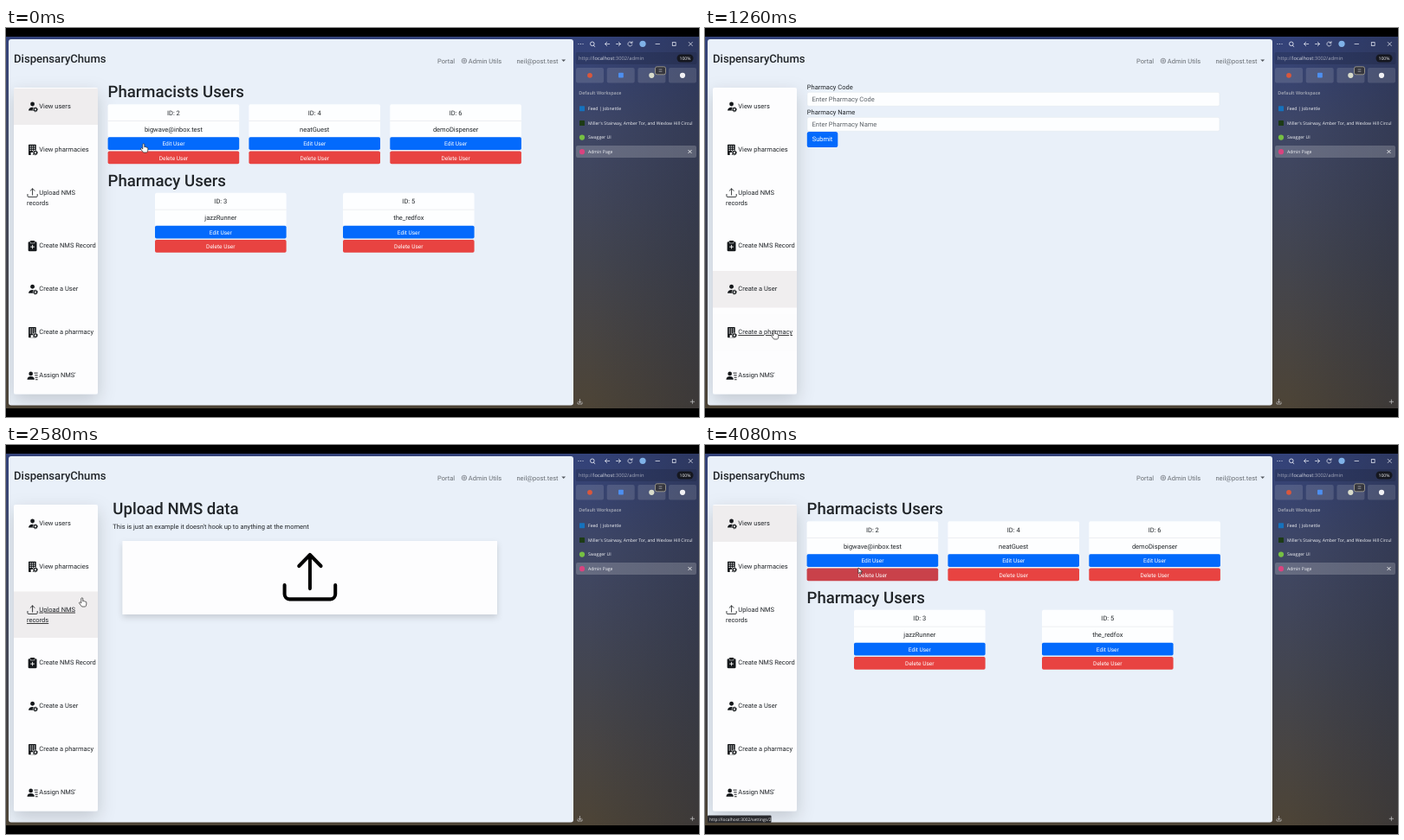
Recreate the animation shown at these times as an HTML page. Size 800 px wide and 450 px high, loop 4140 ms.

```html
<!DOCTYPE html>
<html lang="en">
<head>
<meta charset="utf-8">
<title>Admin page walkthrough</title>
<style>
  html, body { margin: 0; width: 100%; height: 100%; overflow: hidden; background: #000; }
  svg { display: block; width: 800px; height: 450px; }
  text { font: 7.5px Roboto, sans-serif; fill: #212529; text-rendering: geometricPrecision; }
  .h1 { font-size: 18.6px; font-weight: 500; }
  .brand { font-size: 13.1px; font-weight: 500; }
  .nav { fill: #696e74; }
  .btn { font-size: 6.56px; fill: #fff; }
  .big { fill: #fff; }
  .hint { fill: #5b6167; }
  .date { word-spacing: -.35px; }
  .tab { font: 5.1px "Open Sans", sans-serif; fill: #f2f3f6; }
  .space { font: 600 5.4px "Open Sans", sans-serif; fill: #a9adb9; }
  .url { font: 5.8px "Open Sans", sans-serif; fill: #a4a9bb; }
  .status { font: 4.9px "Open Sans", sans-serif; fill: #eee; }
  .line { fill: none; stroke-linecap: round; stroke-linejoin: round; }
</style>
</head>
<body>
<svg id="stage" viewBox="0 0 800 450"></svg>
<script>
const LOOP = 4140, STEP = 60, FADE = 200;
const BLUE = '#036afc', RED = '#e84341', INK = '#15181b';

const rect = (x, y, w, h, fill, r = 0, more = '') =>
  `<rect x="${x}" y="${y}" width="${w}" height="${h}" rx="${r}" fill="${fill}" ${more}/>`;
const dot = (x, y, r, fill, more = '') => `<circle cx="${x}" cy="${y}" r="${r}" fill="${fill}" ${more}/>`;
const line = (d, color, width = 1) => `<path class="line" d="${d}" stroke="${color}" stroke-width="${width}"/>`;
// y is the visual middle of the line of text
const text = (x, y, s, cls = '', anchor = 'start') =>
  `<text x="${x}" y="${y + 2.7}" class="${cls}" text-anchor="${anchor}">${s}</text>`;
const heading = (x, y, s) => `<text x="${x}" y="${y}" class="h1">${s}</text>`;

const gear = (x, y) => dot(x, y, 4, '#fff') + dot(x, y, 2.3, 'none', `stroke="${INK}" stroke-width="1.7"`) +
  dot(x, y, 3.4, 'none', `stroke="${INK}" stroke-width="1" stroke-dasharray="1.35 1.32"`);
const uploadPath = 'M.6 10v2.6a1.4 1.4 0 0 0 1.4 1.4h12a1.4 1.4 0 0 0 1.4-1.4V10M8 11V1.5M4.8 4.6 8 1.4l3.2 3.2';

const icons = {
  user: dot(8, 4.2, 3.2, INK) + `<path d="M2 14c0-3 2.5-5 6-5 2 0 4 .8 5 2v3z" fill="${INK}"/>` + gear(12.4, 12.5),
  building: rect(2, 0, 11.5, 16, INK, 1) +
    [3, 6, 9].map(y => [4, 7, 10].map(x => rect(x, y - 1, 1.6, 1.6, '#fff')).join('')).join('') +
    rect(5.5, 12, 3, 4, '#fff') + gear(12.4, 12.5),
  upload: line(uploadPath, INK, 1.1),
  clip: rect(1.5, 1.5, 13, 14.5, INK, 1.8) + rect(4.5, 0, 7, 3.4, INK, 1) +
    line('M5 2.5v1.3h6V2.5', '#fff', .7) + line('M8 6.8v5M5.5 9.3h5', '#fff', 1.2),
  lines: dot(5.5, 5, 3.1, INK) + `<path d="M0 14c0-3 2-5 5.5-5s5.5 2 5.5 5z" fill="${INK}"/>` +
    line('M11 4h4.5M12 7.4h3.5M12.5 10.7h3M13 14h2.5', INK, 1.2)
};

// name, row top, row height, text middle, icon
const menu = [
  ['View users', 70, 42, 90, 'user'],
  ['View pharmacies', 120, 42, 140, 'building'],
  ['Upload NMS', 169.5, 53.5, 190, 'upload'],
  ['Create NMS Record', 231, 42.5, 251.3, 'clip'],
  ['Create a User', 281, 42.5, 301.3, 'user'],
  ['Create a pharmacy', 331, 42.5, 351.3, 'building'],
  ["Assign NMS'", 381, 42, 401.3, 'lines']
];

const menuItem = ([name, top, h, mid, icon], i) =>
  rect(9, top, 97, h, '#efedee', 0, `id="row${i}"`) +
  `<g transform="translate(24.5 ${mid - 5.2}) scale(.76)">${icons[icon]}</g>` +
  `<g id="label${i}">${text(38.3, mid, name)}${i === 2 ? text(24, mid + 12.5, 'records') : ''}</g>`;

const button = (x, y, label, fill, id = '') =>
  rect(x, y, 151.6, 14.8, fill, 1.8, id && `id="${id}"`) + text(x + 75.8, y + 7.3, label, 'btn', 'middle');

const card = (x, y, id, name, isUser, mark = '') =>
  rect(x, y, 151.6, 38, '#fdfeff', 2) + rect(x, y + 19, 151.6, .6, '#e2e4e8') +
  text(x + 75.8, y + 9.8, 'ID: ' + id, '', 'middle') + text(x + 75.8, y + 28.8, name, '', 'middle') +
  (isUser
    ? button(x, y + 38, 'Edit User', BLUE) + button(x, y + 54.2, 'Delete User', RED, mark)
    : button(x, y + 38, 'View Dashboard', BLUE));

const input = (y, value, cls = '') =>
  rect(118, y - 8, 476, 16, '#fdfeff', 2, 'stroke="#dfe4ea" stroke-width=".5"') + text(123.6, y, value, cls);
const field = (y, label, value, cls) => text(117.8, y, label) + input(y + 14.3, value, cls);
const calendar = y => rect(580.5, y - 2.5, 5.5, 5.2, 'none', .6, 'stroke="#222" stroke-width=".7"') +
  line(`M580.5 ${y - 1.7}h5.5`, '#222', 1);

const radios =
  dot(121.5, 154.6, 3.7, BLUE) + dot(121.5, 154.6, 1.6, '#fff') + text(128.8, 154.6, 'Concent given') +
  dot(121.5, 166.7, 3.6, '#fdfeff', 'stroke="#d8dde3" stroke-width=".5"') + text(128.8, 166.7, 'No concent given');

const patient = [
  ['Patient First name:', 'jory'], ['Patient surname:', 'fen'], ['DOB:', '12 / 02 / 1993', 'date'],
  ['NHS Number:', '4000112233'], ['Address 1:', '315 lantern rowde'], ['Address 2:', ''],
  ['Town:', 'stockport'], ['County', 'Cheshire'], ['Postcode:', 'qz0 07b'], ['Phone Number:', '']
].map(([label, value, cls], i) => field(179 + i * 28.98, label, value, cls)).join('');

const shortForm = (a, b) =>
  field(68, a, 'Enter ' + a, 'hint') + field(97, b, 'Enter ' + b, 'hint') +
  rect(117.8, 120, 35.5, 18, BLUE, 2.6) + text(135.5, 128.7, 'Submit', 'big', 'middle');

const cols = [117.6, 280.4, 443.3];
const pages = [
  heading(117.5, 80, 'Pharmacists Users') +
    card(cols[0], 88.3, 2, 'bigwave@inbox.test', true, 'del') +
    card(cols[1], 88.3, 4, 'neatGuest', true) + card(cols[2], 88.3, 6, 'demoDispenser', true) +
    heading(117.5, 182.5, 'Pharmacy Users') +
    card(172, 190.8, 3, 'jazzRunner', true) + card(389, 190.8, 5, 'the_redfox', true),
  heading(117.5, 80, 'Pharmacies') +
    ['Fennel Brow Pharmacy (fra38)', 'Velvetduke Pharmacy (FJG88)', 'Crag Pharmacy (FPL14)']
      .map((name, i) => card(cols[i], 88.3, i + 1, name, false)).join(''),
  heading(123.3, 80, 'Upload NMS data') +
    text(123.3, 94, "This is just an example it doesn't hook up to anything at the moment") +
    rect(134.5, 111, 432.5, 85, '#fdfdfe', 0, 'filter="url(#soft)"') +
    `<g transform="translate(319.2 121.2) scale(3.96 4.08)">${line(uploadPath, '#000', 1.02)}</g>`,
  field(68, 'Please select the pharmacy that the NMS came from', 'FJG88') +
    line('M583.8 81.2l2 2 2-2', '#333', .9) +
    field(97, 'Rx Item:', 'paracetamol 500mg') +
    field(125.8, 'Prescription Date', '27 / 05 / 2025', 'date') + calendar(140) +
    radios + patient + calendar(251),
  shortForm('Username', 'Password'),
  shortForm('Pharmacy Code', 'Pharmacy Name')
];

const tab = (y, title, mark) => mark + text(672, y - .9, title, 'tab');
const tiles = [658, 693.7, 729.4, 765].map(x => rect(x, 46, 32, 17.5, '#fff', 2, 'opacity=".13"')).join('');
const pale = '#dfe3ee';

const browser =
  [661, 663.5, 666].map(x => dot(x, 18.5, .6, pale)).join('') +
  dot(676.8, 18.3, 2.3, 'none', `stroke="${pale}" stroke-width=".9"`) + line('M678.5 20.5l1.3 1', pale, .9) +
  line('M696.7 18.5h-5M693.7 16.3l-2.2 2.2 2.2 2.2M704.5 18.5h5M707.3 16.3l2.2 2.2-2.2 2.2', pale, .8) +
  line('M722.6 17.2a2.5 2.5 0 1 0 .2 2.2M723 15.6v1.8h-1.8', pale, .8) +
  dot(735, 18.3, 3.6, '#7fb2e8') +
  line('M750 18.5h4.5M788.3 16.5l4 4M792.3 16.5l-4 4', pale, .8) +
  rect(769.3, 16.6, 3.8, 3.8, 'none', 0, `stroke="${pale}" stroke-width=".8"`) +
  rect(657.5, 28, 140, 14, '#10152c', 2, 'opacity=".2"') +
  text(661, 34.2, 'http://<tspan fill="#d7dae4">localhost</tspan>:3002/admin', 'url') +
  rect(774.5, 30.5, 19, 9, '#15171f', 4.5) + text(784, 34.1, '100%', 'tab', 'middle') +
  tiles + dot(674, 54.8, 2.9, '#d9573c') + rect(707, 51.8, 5.8, 5.8, '#4d8ff0', .8) +
  dot(745.3, 54.8, 3.1, '#d9dccb') + dot(781, 54.8, 3.1, '#f1f1f4') +
  rect(749.5, 44.8, 12, 9, '#34353d', 2, 'stroke="#b9b49b" stroke-width=".7"') +
  line('M754 48h3M754 50.3h3', '#c9c9ce', .6) +
  text(661.3, 74.4, 'Default Workspace', 'space') +
  rect(658, 136, 139, 14, '#fff', 2, 'opacity=".2"') +
  `<g clip-path="url(#panel)">` +
  tab(93.2, 'Feed | Jobnettle', rect(662, 90.2, 6, 6, '#1672bd', .6)) +
  tab(110, "Miller's Stairway, Amber Tor, and Wexlow Hill Circular", rect(662, 107, 6, 6, '#1d3b16', .6)) +
  tab(126.6, 'Swagger UI', dot(665, 126.6, 3.1, '#76c043')) +
  tab(143.2, 'Admin Page', dot(665, 143.2, 3.1, '#d9437f')) + '</g>' +
  line('M787.8 141.3l3.4 3.4M791.2 141.3l-3.4 3.4', '#fff', .8) +
  line('M662.5 429.5v4M661 432l1.5 1.5 1.5-1.5M660 433v2h5v-2M790.2 432.3h4.4M792.4 430.1v4.4', '#c9c9cc', .7);

const header =
  `<text x="9" y="40.4" class="brand">DispensaryChums</text>` +
  text(498, 38, 'Portal', 'nav') + text(533.8, 38, 'Admin Utils', 'nav') + text(637.5, 38, 'neil@post.test', 'nav', 'end') +
  dot(528.9, 38, 2.8, 'none', 'stroke="#696e74" stroke-width=".7"') +
  dot(528.9, 38, 1.1, 'none', 'stroke="#696e74" stroke-width=".7"') +
  '<path d="M641.3 36.6h4.8l-2.4 2.4z" fill="#555a60"/>';

const hand = `<path d="M-1.2 1V-4.2a1 1 0 0 1 2 0V-1.2c.4-.6 1.4-.5 1.5.2.4-.5 1.3-.3 1.4.4.5-.3 1.1 0 1.1.7V2c0 1.6-.8 2.6-1.2 3H-.4C-1.2 4-2.6 2.4-3.4 1c-.4-.8.5-1.5 1.1-1z"
  fill="#fff" stroke="#222" stroke-width=".7" stroke-linejoin="round"/>`;
const arrow = `<path d="M-1-3.5v6.6l1.6-1.4 1 2.3 1-.4-1-2.3h2z" fill="#fff" stroke="#111" stroke-width=".6"/>`;

const stage = document.getElementById('stage');
stage.innerHTML = `
<defs>
  <linearGradient id="sky" x2="0" y2="1">
    <stop offset="0" stop-color="#33427a"/><stop offset=".25" stop-color="#3f4766"/>
    <stop offset=".6" stop-color="#43454f"/><stop offset="1" stop-color="#4d4436"/>
  </linearGradient>
  <linearGradient id="dusk"><stop offset=".84" stop-color="#23283a" stop-opacity="0"/>
    <stop offset="1" stop-color="#23283a" stop-opacity=".4"/></linearGradient>
  <filter id="soft" x="-10%" y="-20%" width="120%" height="150%">
    <feDropShadow dx="0" dy="3.5" stdDeviation="3.5" flood-opacity=".15"/></filter>
  <filter id="deep" x="-40%" y="-10%" width="180%" height="125%">
    <feDropShadow dx="0" dy="7" stdDeviation="10" flood-opacity=".17"/></filter>
  <clipPath id="page"><rect x="3" y="13" width="652" height="423.5" rx="3"/></clipPath>
  <clipPath id="panel"><rect x="657" y="80" width="136" height="75"/></clipPath>
</defs>
${rect(0, 0, 800, 450, '#000')}${rect(0, 10, 800, 430, 'url(#sky)')}${rect(0, 10, 800, 430, 'url(#dusk)')}
<g clip-path="url(#page)">
  ${rect(3, 13, 652, 424, '#e9f0f9')}${header}
  ${rect(9, 69, 97, 354.5, '#fdfdfe', 2, 'filter="url(#deep)"')}
  ${menu.map(menuItem).join('')}
  ${pages.map((p, i) => `<g id="page${i}">${p}</g>`).join('')}
</g>
${browser}
<g id="status">${rect(3, 428.5, 73.5, 8.5, '#292a2e', 1)}${text(5, 432, 'http://localhost:3002/settings/2', 'status')}</g>
<g id="cursor"><g id="hand">${hand}</g><g id="arrow">${arrow}</g></g>`;

const get = id => document.getElementById(id);
const show = (id, on) => { get(id).style.display = on ? '' : 'none'; };

// time, page opened
const visits = [[-FADE, 0], [420, 1], [600, 2], [750, 3], [1000, 4], [1230, 5],
  [1850, 4], [2010, 3], [2340, 2], [2820, 1], [3480, 0]];
// time, pointer x, pointer y
const path = [[0, 159, 139], [240, 92, 104], [420, 70, 142], [600, 66, 195], [720, 70, 248], [780, 71, 252],
  [1000, 76, 305], [1200, 80, 353], [1260, 80, 355], [1500, 82, 360], [1740, 82, 348], [1860, 82, 305],
  [2040, 82, 268], [2160, 84, 250], [2400, 88, 195], [2580, 88, 182], [2820, 88, 146], [3000, 108, 140],
  [3180, 149, 134], [3330, 120, 122], [3480, 86, 94], [3660, 100, 100], [3840, 164, 133],
  [3960, 182, 150], [4080, 178, 145.5], [4140, 159, 139]];

function pointer(t) {
  const i = Math.max(1, path.findIndex(p => p[0] > t));
  const [t0, x0, y0] = path[i - 1], [t1, x1, y1] = path[i];
  const u = (t - t0) / (t1 - t0), k = u * u * (3 - 2 * u);
  return [x0 + (x1 - x0) * k, y0 + (y1 - y0) * k];
}

function draw(t) {
  const n = visits.filter(v => v[0] <= t).length - 1;
  const [since, page] = visits[n], last = n ? visits[n - 1][1] : page;
  const k = Math.min(1, (t - since) / FADE), fade = k * k * (3 - 2 * k) * .9 + k * .1;
  const [x, y] = pointer(t);

  menu.forEach(([, top, h], i) => {
    const on = (i === page ? fade : 0) + (i === last && n ? 1 - fade : 0);
    get('row' + i).style.opacity = Math.min(1, n ? on : +(i === page));
    const over = x > 9 && x < 106 && y > top && y < top + h;
    get('label' + i).style.textDecoration = over ? 'underline' : 'none';
  });
  pages.forEach((_, i) => show('page' + i, i === page));

  get('del').setAttribute('fill', t >= 3930 ? '#c9414a' : RED);
  show('status', t >= 3960);
  show('arrow', t >= 4080);
  show('hand', t < 4080);
  get('cursor').setAttribute('transform', `translate(${x.toFixed(1)} ${y.toFixed(1)})`);
}

const start = performance.now();
function tick() {
  const t = (performance.now() - start) % LOOP;
  draw(Math.floor(t / STEP) * STEP);
  requestAnimationFrame(tick);
}
tick();
</script>
</body>
</html>
```
